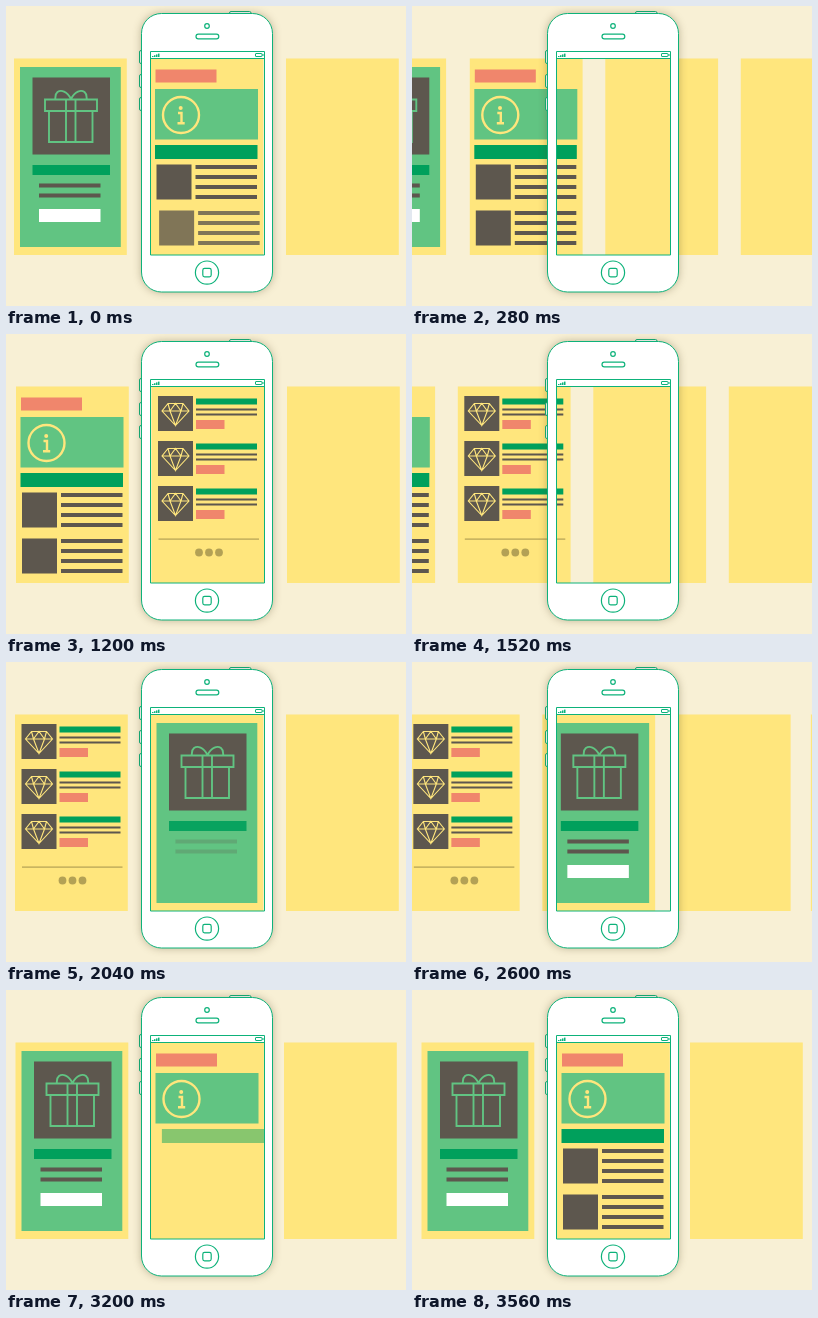
Animation, 400 px wide and 300 px high, one loop 3.84 s. Source, as an HTML page with a canvas:

```html
<!DOCTYPE html>
<html lang="en">
<head>
<meta charset="utf-8">
<title>Phone pages</title>
<style>
html, body { margin: 0; width: 100%; height: 100%; overflow: hidden; background: #f8f0d5; }
canvas { display: block; width: 400px; height: 300px; }
</style>
</head>
<body>
<canvas id="stage" width="400" height="300"></canvas>
<script>
const ctx = document.getElementById('stage').getContext('2d');
const CREAM = '#f8f0d5', YELLOW = '#ffe67d', MINT = '#61c482', GREEN = '#00a05c',
      DARK = '#5d574e', CORAL = '#f0866c', OLIVE = '#b3a155', LINE = '#0db27a';
const LOOP = 3840, STEP = 40, FADE = 220, SLIDE = 520;
const slides = [[70, 134.5], [1270, 136.5], [2572, 135]]; // start, distance

const clamp = v => Math.max(0, Math.min(1, v));
const easeOut = u => 1 - (1 - u) ** 2;

function box(x, y, w, h, color) {
  ctx.fillStyle = color;
  ctx.fillRect(x, y, w, h);
}

function dot(x, y, r, color) {
  ctx.fillStyle = color;
  ctx.beginPath();
  ctx.arc(x, y, r, 0, 7);
  ctx.fill();
}

function stroke(d, color, width) {
  ctx.strokeStyle = color;
  ctx.lineWidth = width;
  ctx.stroke(new Path2D(d));
}

// Fades a part in while it glides left over the given distance.
function appear(age, start, shift, draw) {
  const a = clamp((age - start) / FADE);
  if (!a) return;
  ctx.save();
  ctx.globalAlpha = a;
  ctx.translate(shift * (1 - a), 0);
  draw();
  ctx.restore();
}

function article(y) {
  box(6, y, 35, 35, DARK);
  for (let i = 0; i < 4; i++) box(45, y + 0.5 + i * 10, 61.5, 4, DARK);
}

function infoPage(age) {
  appear(age, 282, 20, () => box(5, 63.5, 61, 13, CORAL));
  appear(age, 405, 12, () => {
    box(4.5, 83, 103, 50.5, MINT);
    stroke('M48.5 109a18 18 0 1 1-36 0a18 18 0 1 1 36 0Z', YELLOW, 2.4);
    dot(30.2, 102, 2, YELLOW);
    stroke('M27.5 107H31V117.2M27 117.2H34.2', YELLOW, 2.4);
  });
  appear(age, 525, 12, () => box(4.5, 139, 102.5, 14, GREEN));
  appear(age, 645, 12, () => article(158.5));
  appear(age, 768, 12, () => article(204.5));
}

function diamond(x, y) {
  ctx.save();
  ctx.translate(x, y);
  stroke('M10 7.5H25L31 15L17.5 29.5L4 15ZM4 15H31M10 7.5L12 15L17.5 29.5L23 15L25 7.5' +
         'M12 15L17.5 7.5L23 15', YELLOW, 1.1);
  ctx.restore();
}

function listPage(age) {
  for (let i = 0; i < 3; i++) {
    const y = 62 + i * 45, start = 335 + i * 176;
    appear(age, start, 12, () => {
      box(6.5, y, 35, 35, DARK);
      diamond(6.5, y);
      box(44.5, y + 2.5, 61, 6, GREEN);
    });
    appear(age, start + 88, 12, () => {
      box(44.5, y + 12.5, 61, 2, DARK);
      box(44.5, y + 17.5, 61, 2, DARK);
    });
    appear(age, start + 209, 12, () => box(44.5, y + 24, 28.5, 9, CORAL));
  }
  appear(age, 870, 0, () => {
    box(7, 204.5, 100.5, 1.2, OLIVE);
    for (let i = 0; i < 3; i++) dot(47.5 + i * 10, 218.5, 3.9, OLIVE);
  });
}

function giftPage(age) {
  appear(age, 280, 0, () => box(6, 61, 100.8, 180, MINT));
  appear(age, 425, 0, () => {
    box(18.5, 71.5, 77.5, 77, DARK);
    stroke('M31 93.5H83V105H31ZM35 105V136H78.5V105M52 93.5V136M61.5 93.5V136' +
           'M57 93C53 85 47 83.5 43.5 86C40.5 88.5 42 91.5 41 93.5' +
           'M57 93C61 85 67 83.5 70.5 86C73.5 88.5 72 91.5 73 93.5', MINT, 1.9);
  });
  appear(age, 570, 0, () => box(18.5, 159, 77.5, 10, GREEN));
  appear(age, 715, 0, () => {
    box(25, 177.5, 61.5, 4, DARK);
    box(25, 187.5, 61.5, 4, DARK);
  });
  appear(age, 790, 0, () => box(25, 203, 61.5, 13, '#fff'));
}

function page(x, draw, age) {
  ctx.save();
  ctx.translate(x, 0);
  box(0, 52.5, 112.8, 196.5, YELLOW);
  if (draw) draw(age);
  ctx.restore();
}

const body = new Path2D(), bezel = new Path2D(), outside = new Path2D();
body.roundRect(135.5, 7.5, 131, 278.5, 20);
bezel.addPath(body);
bezel.rect(144.5, 52.5, 114, 196.5);
outside.rect(0, 0, 400, 300);
outside.rect(144.5, 52.5, 114, 196.5);

function outline(x, y, w, h, r, fill) {
  ctx.beginPath();
  ctx.roundRect(x, y, w, h, r);
  if (fill) {
    ctx.fillStyle = fill;
    ctx.fill();
  }
  ctx.stroke();
}

function phone() {
  ctx.strokeStyle = LINE;
  ctx.lineWidth = 1;
  outline(223.5, 5.5, 21.5, 6, 1.5, '#fff');
  for (const y of [44.5, 68.5, 91.5]) outline(133.5, y, 6, 13, 1.5, '#fff');

  ctx.save();
  ctx.clip(outside, 'evenodd');
  ctx.shadowColor = 'rgba(90, 75, 40, .4)';
  ctx.shadowBlur = 9;
  ctx.fillStyle = '#fff';
  ctx.fill(bezel, 'evenodd');
  ctx.restore();

  ctx.stroke(body);
  outline(144.5, 45.5, 114, 203.5, 0);
  stroke('M144.5 52.5H258.5', LINE, 1);
  for (let i = 0; i < 4; i++) box(146 + i * 2, 50 - i * 0.8, 1.5, 1 + i * 0.8, LINE);
  outline(249.5, 47.5, 6.5, 3, 0.5);
  box(256.5, 48, 1, 2, LINE);

  ctx.lineWidth = 1.2;
  outline(198.7, 17.7, 4.6, 4.6, 2.3);
  outline(190, 28.2, 22.8, 4.6, 2.3);
  outline(189.4, 255, 23.2, 23.2, 11.6);
  outline(196.8, 262.4, 8.4, 8.4, 1.8);
}

function render(t) {
  let scroll = 0;
  for (const [start, distance] of slides)
    scroll += distance * easeOut(clamp((t - start) / SLIDE));

  box(0, 0, 400, 300, CREAM);
  page(8 - scroll, giftPage, LOOP);
  page(144.5 - scroll, infoPage, t + 940);
  page(280 - scroll, listPage, t - slides[0][0]);
  page(415.5 - scroll, giftPage, t - slides[1][0]);
  page(551 - scroll, infoPage, t - slides[2][0]);
  page(684 - scroll);
  phone();
}

let origin;
function tick(now) {
  origin ??= now;
  render(Math.floor((now - origin) % LOOP / STEP) * STEP);
  requestAnimationFrame(tick);
}
requestAnimationFrame(tick);
</script>
</body>
</html>
```
